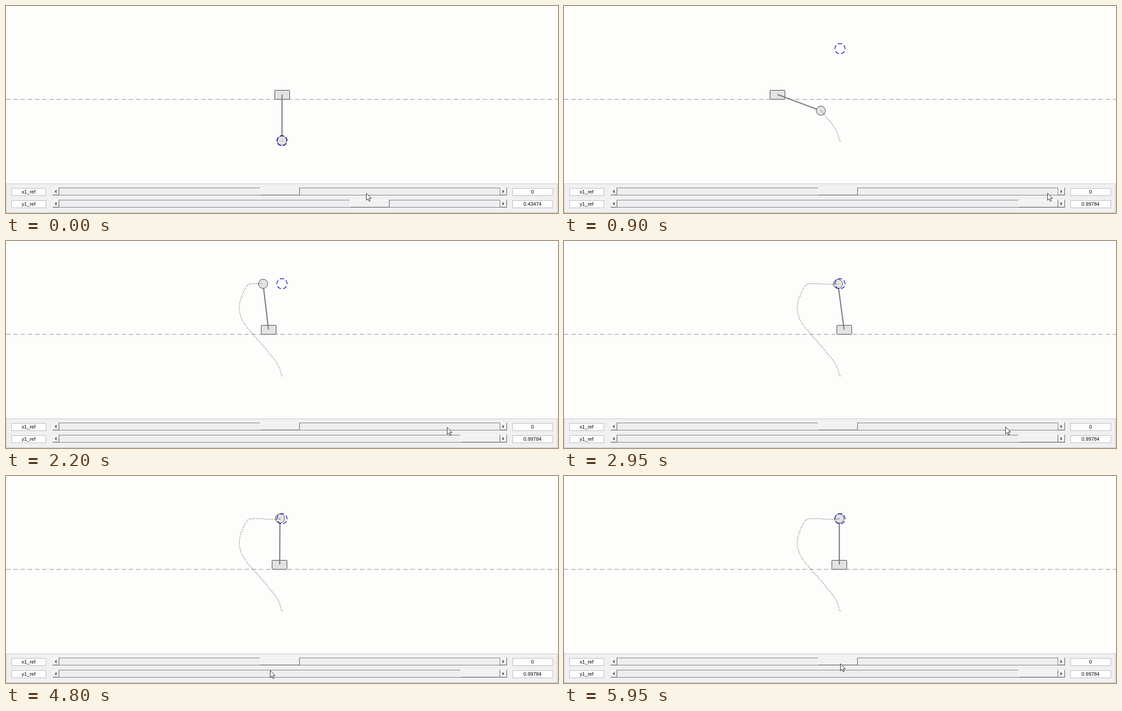
An HTML page that plays this animation: 1223 px wide and 458 px high, repeating every 6000 ms.

```html
<!DOCTYPE html>
<html lang="en">
<head>
<meta charset="utf-8">
<title>Cart pendulum</title>
<style>
  html, body { margin: 0; width: 100%; height: 100%; overflow: hidden; background: #fdfdfc; }
  svg { display: block; position: absolute; left: 0; top: 0; }
  text { font: 11px "Liberation Sans", Arial, sans-serif; text-anchor: middle; fill: #000; }
</style>
</head>
<body>
<svg id="stage" width="1223" height="458" viewBox="0 0 1223 458"></svg>
<script>
const LOOP = 6000, STEP = 50, PIVOT = 196, ROD = 102, DOT_GAP = 4;
const DRAG = { from: 798, length: 245, end: 650, low: .43474, high: .99784 };

// Key points: time, ball x
const BALL = [
  [100, 611.5], [600, 606.5], [750, 595.5], [900, 569], [1100, 525.5], [1200, 517],
  [1300, 518.7], [1500, 530.5], [1950, 553], [2600, 596], [2950, 607], [4000, 605.5], [5950, 610]
];

// Key points: time, pointer x, pointer y
const POINTER = [
  [50, 798, 414], [600, 1076, 414], [900, 1071, 414], [1300, 977, 412],
  [4550, 978, 411], [4800, 585, 430], [5000, 590, 430], [5500, 612, 415]
];

const clamp = (v, lo, hi) => Math.max(lo, Math.min(hi, v));

function segment(table, t) {
  let i = 0;
  while (i < table.length - 2 && table[i + 1][0] <= t) i++;
  const a = table[i], b = table[i + 1];
  return { i, a, b, u: clamp((t - a[0]) / (b[0] - a[0]), 0, 1) };
}

function linear(table, t) {
  const { a, b, u } = segment(table, t);
  return [1, 2].map(k => a[k] + (b[k] - a[k]) * u);
}

// Cubic Hermite curve through unevenly timed points
function smooth(table, t) {
  const { i, a, b, u } = segment(table, t);
  const before = table[i - 1] || a, after = table[i + 2] || b;
  const slope = (p, q) => (q[1] - p[1]) / (q[0] - p[0]);
  const ease = u * u * (3 - 2 * u);
  const bend = slope(before, b) * (1 - u) - slope(a, after) * u;
  return a[1] + (b[1] - a[1]) * ease + (b[0] - a[0]) * u * (1 - u) * bend;
}

function bump(t, centre, reach = 900) {
  const u = (t - centre) / reach;
  return Math.abs(u) < 1 ? Math.cos(u * Math.PI / 2) ** 2 : 0;
}

// Rod angle from upright: swing up, overshoot, settle
function angle(t) {
  const u = clamp((t - 137) / 1802, 0, 1);
  const swing = 180 * (1 - u * u * (3 - 2 * u));
  return (swing - 11.4 * bump(t, 2600) + 1.2 * bump(t, 4200)) * Math.PI / 180;
}

function pose(t) {
  const a = angle(t), x = smooth(BALL, t);
  return { x, y: PIVOT - ROD * Math.cos(a), cart: x - ROD * Math.sin(a) };
}

const stage = document.getElementById("stage");

function set(el, attrs) {
  for (const k in attrs) el.setAttribute(k, attrs[k]);
}
function add(tag, attrs, parent = stage) {
  const el = document.createElementNS("http://www.w3.org/2000/svg", tag);
  set(el, attrs);
  parent.appendChild(el);
  return el;
}
function box(x, y, width, height, fill, extra, parent) {
  return add("rect", { x, y, width, height, fill, ...extra }, parent);
}
function line(d, stroke, parent) {
  return add("path", { d, stroke, fill: "none" }, parent);
}

function raised(x, y, w, h) {
  const g = add("g", {});
  box(x, y, w, h, "#f1f1f2", {}, g);
  line(`M${x} ${y + .5}h${w}M${x + .5} ${y}v${h}`, "#fff", g);
  line(`M${x + 1} ${y + h - 1.5}h${w - 2}v${2 - h}`, "#b4b4b6", g);
  line(`M${x} ${y + h - .5}h${w - .5}v${-h}`, "#606066", g);
  return g;
}
function field(x, y, w, label) {
  box(x + .5, y + .5, w - 1, 16, "#fefefe", { stroke: "#b4b4b8" });
  const text = add("text", { x: x + (w - 1) / 2, y: y + 12 });
  text.textContent = label;
  return text;
}
function arrow(x, y, dir) {
  add("path", { d: `M${x} ${y}l${-4 * dir} -4v8z`, fill: "#55555c" });
}
function slider(y, label, thumbX) {
  field(12, y, 77, label);
  box(103, y - 1, 1006, 17, "#eeeef0");
  line(`M117 ${y - .5}h978M117 ${y + 15.5}h978`, "#707078");
  raised(103, y - 1, 15, 17);
  raised(1094, y - 1, 16, 17);
  line(`M1094.5 ${y - 1}v17`, "#707078");
  arrow(108, y + 7.5, -1);
  arrow(1104, y + 7.5, 1);
  const thumb = raised(thumbX, y - 1, 88, 17);
  return [thumb, field(1122, y, 90, "0")];
}

line("M0 206.5H1223", "#80808c").setAttribute("stroke-dasharray", "10 6");
const cart = box(0, 186.5, 33, 20, "#e2e2e3", { rx: 1, stroke: "#26262c" });
const rod = add("line", { y1: PIVOT, stroke: "#808082", "stroke-width": 2.6 });
const ball = add("circle", { r: 10.2, fill: "#e2e2e3", stroke: "#303036" });
const ring = add("circle", {
  cx: 611.5, r: 11.3, fill: "none", stroke: "#0808ac", "stroke-width": 1.5,
  pathLength: 5, "stroke-dasharray": ".67 .33", "stroke-dashoffset": .585
});
const trail = line("", "#000");

box(.5, 393.5, 1221, 64, "#f0f0f1", { stroke: "#b8b8bc" });
line("M1 394.5H1221M1.5 394V457", "#fafafa");
slider(403, "x1_ref", 563);
const [thumb, value] = slider(430, "y1_ref", 762);

const pointer = add("path", {
  d: "M.5 .5V16L4 12.6L6.6 18.2L9 17.1L6.5 11.7H11.3Z",
  fill: "#fff", stroke: "#101014"
});

// Dots evenly spaced along the path of the ball, each with its time
const dots = [];
let last = pose(0), travelled = DOT_GAP;
for (let t = 0; t < LOOP; t += 2) {
  const p = pose(t);
  travelled += Math.hypot(p.x - last.x, p.y - last.y);
  last = p;
  if (travelled >= DOT_GAP) {
    travelled -= DOT_GAP;
    dots.push({ t, d: `M${Math.floor(p.x)} ${Math.floor(p.y) + .5}h1.4` });
  }
}

function draw(t) {
  const { x, y, cart: cx } = pose(t);
  const [px, py] = linear(POINTER, t);
  const drag = t >= DRAG.end ? DRAG.length : clamp(px - DRAG.from, 0, DRAG.length);
  const ref = DRAG.low + drag / DRAG.length * (DRAG.high - DRAG.low);

  set(cart, { x: Math.round(cx - 17) + .5 });
  set(rod, { x1: cx, x2: x, y2: y });
  set(ball, { cx: x, cy: y });
  set(ring, { cy: t < STEP ? PIVOT + ROD : PIVOT - ROD * ref + .3 });
  set(trail, { d: dots.filter(p => p.t <= t).map(p => p.d).join("") });
  set(thumb, { transform: `translate(${Math.round(drag)} 0)` });
  set(pointer, { transform: `translate(${Math.round(px)} ${Math.round(py)})` });
  value.textContent = ref.toFixed(5);
}

const start = performance.now();
function tick() {
  const t = (performance.now() - start) % LOOP;
  draw(Math.floor(t / STEP) * STEP);
  requestAnimationFrame(tick);
}
tick();
</script>
</body>
</html>
```
